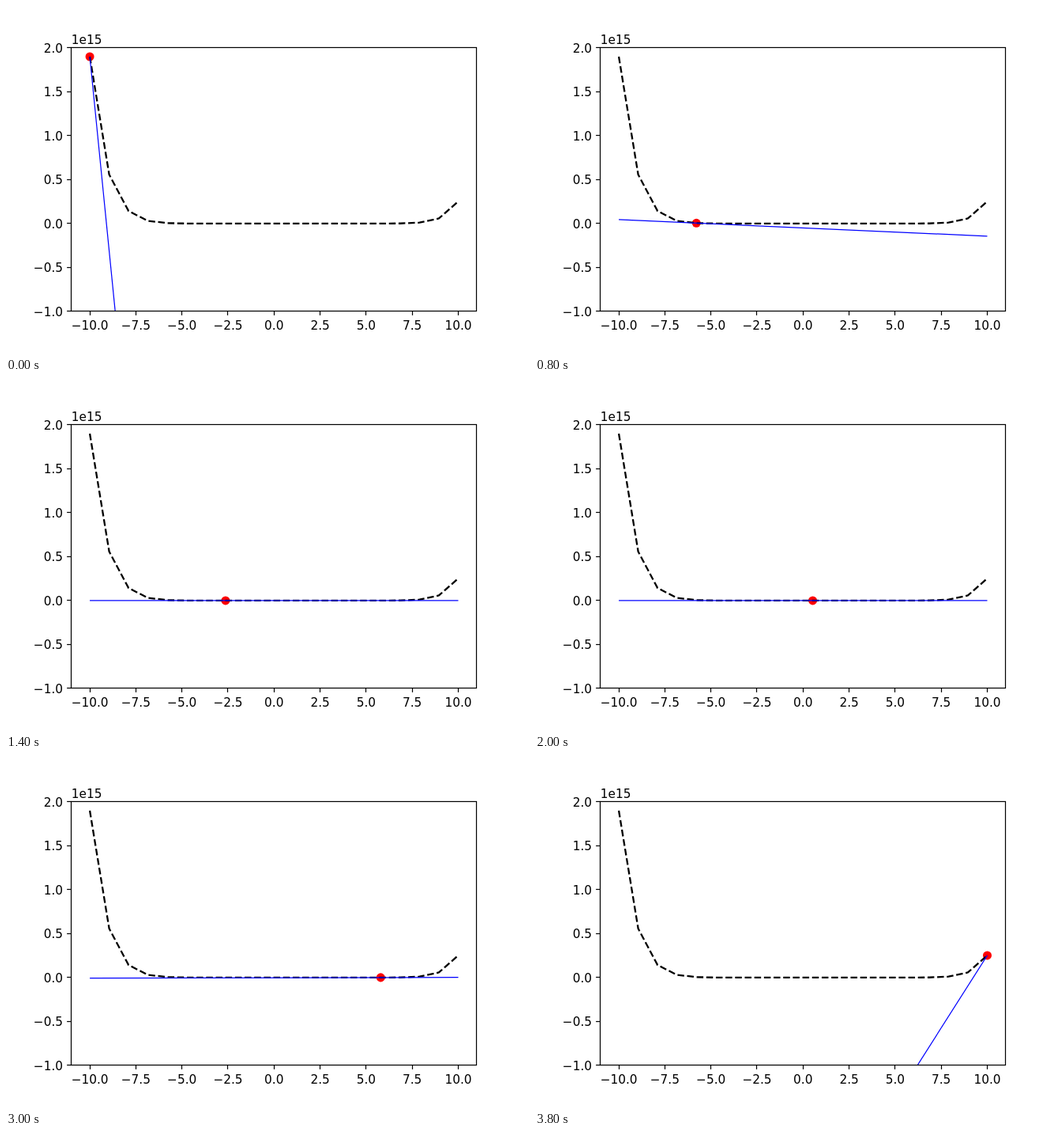
An HTML page that plays this animation: 662x441 px, repeating every 4000 ms.

```html
<!DOCTYPE html>
<html lang="en">
<head>
<meta charset="utf-8">
<title>Tangent along a curve</title>
<style>
  html, body { margin: 0; width: 100%; height: 100%; overflow: hidden; background: #fff; }
  svg { display: block; width: 662px; height: 441px; }
  text { font: 15.3px "DejaVu Sans", sans-serif; fill: #000; }
</style>
</head>
<body>
<svg id="stage" viewBox="0 0 662 441" xmlns="http://www.w3.org/2000/svg"></svg>
<script>
const STEPS = 20, STEP_MS = 200;
const PT = 1.532;
const BOX = { left: 82.75, right: 595.8, top: 52.92, bottom: 385.9 };
const svg = document.getElementById('stage');

function add(parent, tag, attrs, text) {
  const el = document.createElementNS('http://www.w3.org/2000/svg', tag);
  for (const key in attrs) el.setAttribute(key, attrs[key]);
  if (text) el.textContent = text;
  return parent.appendChild(el);
}

// Data to pixels: x spans -11..11, y spans -1..2 (times 1e15)
const px = x => BOX.left + (x + 11) / 22 * (BOX.right - BOX.left);
const py = y => BOX.top + (2 - y) / 3 * (BOX.bottom - BOX.top);
const snap = v => Math.floor(v) + 0.5;
const label = v => v.toFixed(1).replace('-', '\u2212');

const xAt = i => -10 + 20 * i / (STEPS - 1);
const curve = x => 1.9 * ((x - 0.84) / 10.84) ** 12;
const slope = x => 12 * curve(x) / (x - 0.84);

const clip = add(add(svg, 'defs', {}), 'clipPath', { id: 'plot' });
const area = {
  x: BOX.left, y: BOX.top,
  width: BOX.right - BOX.left, height: BOX.bottom - BOX.top
};
add(clip, 'rect', area);
const plot = add(svg, 'g', { 'clip-path': 'url(#plot)' });

const dot = add(plot, 'circle', { r: 3.75 * PT * 0.96, fill: '#f00' });
const points = Array.from({ length: STEPS }, (_, i) =>
  px(xAt(i)).toFixed(2) + ',' + py(curve(xAt(i))).toFixed(2));
add(plot, 'polyline', {
  points: points.join(' '), fill: 'none', stroke: '#000', 'stroke-width': 1.5 * PT,
  'stroke-dasharray': [5.55 * PT, 2.4 * PT].join(' '), 'stroke-linejoin': 'round'
});
const tangent = add(plot, 'line', { stroke: '#00f', 'stroke-width': 0.8 * PT });

// Frame, ticks and labels
const ink = { fill: 'none', stroke: '#000', 'stroke-width': 0.8 * PT };
const x0 = snap(BOX.left), x1 = snap(BOX.right);
const y0 = snap(BOX.top), y1 = snap(BOX.bottom);
add(svg, 'rect', { ...ink, x: x0, y: y0, width: x1 - x0, height: y1 - y0 });

for (let v = -10; v <= 10; v += 2.5) {
  const x = snap(px(v));
  add(svg, 'line', { ...ink, x1: x, x2: x, y1: y1, y2: y1 + 3.5 * PT });
  add(svg, 'text', { x: px(v), y: 408.5, 'text-anchor': 'middle' }, label(v));
}
for (let v = -1; v <= 2; v += 0.5) {
  const y = snap(py(v));
  add(svg, 'line', { ...ink, x1: x0 - 3.5 * PT, x2: x0, y1: y, y2: y });
  add(svg, 'text', { x: BOX.left - 7 * PT, y: py(v) + 5.8, 'text-anchor': 'end' }, label(v));
}
add(svg, 'text', { x: BOX.left, y: 48 }, '1e15');

function place(el, attrs) {
  for (const key in attrs) el.setAttribute(key, attrs[key]);
}

function draw(now) {
  const x = xAt(Math.floor(now / STEP_MS) % STEPS);
  const y = curve(x), k = slope(x);
  place(dot, { cx: px(x), cy: py(y) });
  place(tangent, {
    x1: px(-10), y1: py(y + k * (-10 - x)),
    x2: px(10), y2: py(y + k * (10 - x))
  });
}

function tick() {
  draw(performance.now());
  requestAnimationFrame(tick);
}
tick();
</script>
</body>
</html>
```
